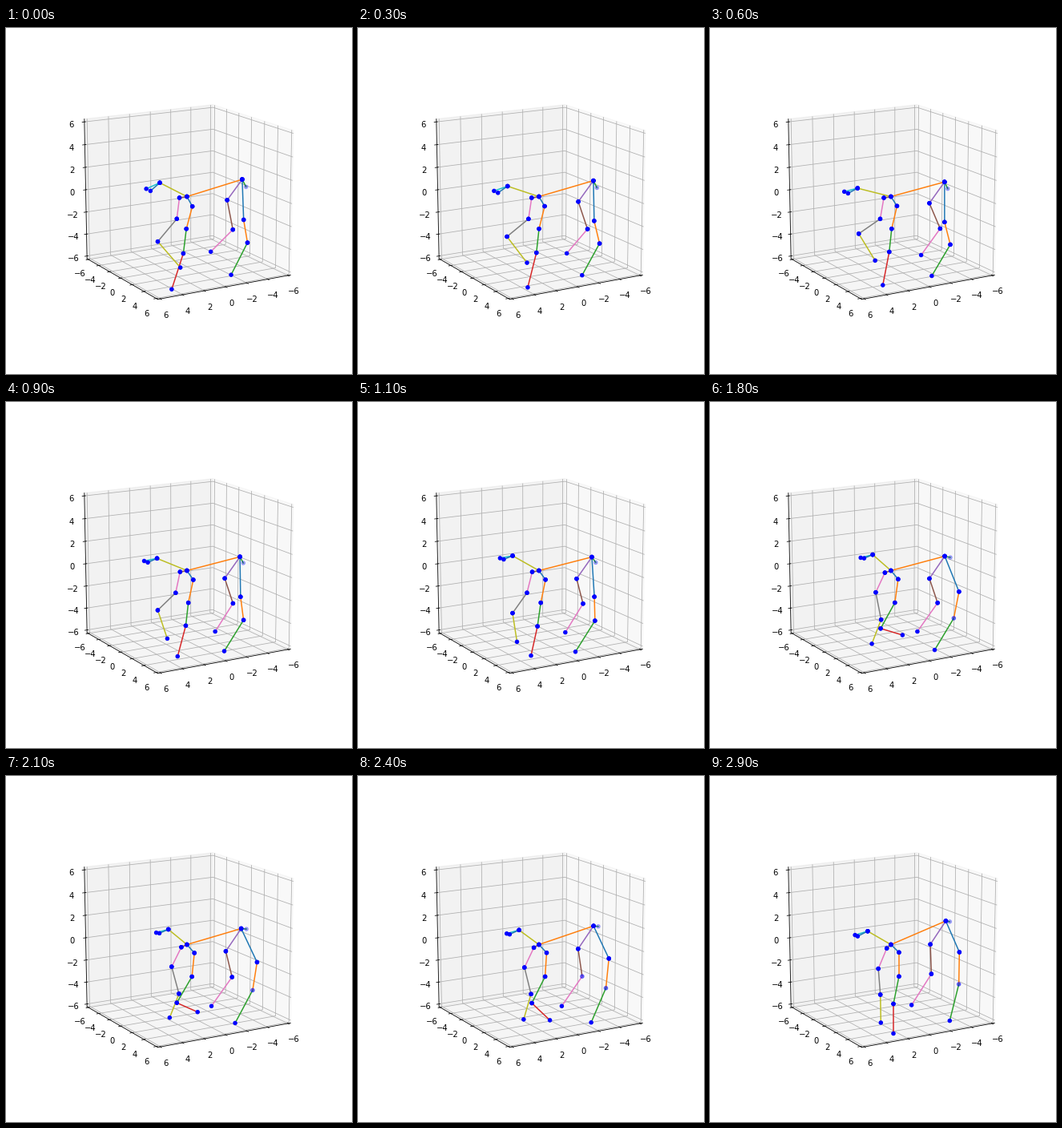
A matplotlib script that plays this animation: 432 px wide and 432 px high, repeating every 3000 ms.

```python
import numpy as np
import matplotlib.pyplot as plt
from matplotlib.animation import FuncAnimation

SIZE, DPI = 432, 72
FRAMES, INTERVAL = 30, 100
CHEST = (225.9, 210.5)


def smooth(values, u):
    """Cubic curve through evenly spaced values, u from 0 to 1."""
    slopes = np.gradient(values)
    k = min(int(u * (len(values) - 1)), len(values) - 2)
    s = u * (len(values) - 1) - k
    ease = s * s * (3 - 2 * s)
    return ((1 - ease) * values[k] + ease * values[k + 1]
            + s * (1 - s) * ((1 - s) * slopes[k] - s * slopes[k + 1]))


# Each bone: joint, parent, cycle colour, then the course of its length (px)
# and of its angle (degrees from straight down, positive to the right).
bones = [
    # nearer front leg
    ("shoulder_a", "chest", 0, (14, 14), (29, 38, 46)),
    ("elbow_a", "shoulder_a", 1, (29, 30), (-15, -10, 0)),
    ("wrist_a", "elbow_a", 2, (31, 29, 37.5, 35), (-7, -6, -9, -28, -28, -11.5)),
    ("paw_a", "wrist_a", 3, (47, 39, 28, 37), (-18, -11, -9, 71, 52, 0)),
    # other front leg
    ("shoulder_b", "chest", 5, (9.5, 7), (-81, -76, -48)),
    ("elbow_b", "shoulder_b", 6, (26.5, 27.5), (-7, -12.5, -26, -22.5)),
    ("wrist_b", "elbow_b", 7, (37, 31, 35, 32.5), (-40, -55.5, -32, 9, 14.5, 4.5)),
    ("paw_b", "wrist_b", 8, (43, 37, 32, 35), (41, 32, 6, -20, -18, 1)),
    # spine and hind legs
    ("hip", "chest", 1, (72.3, 68.3, 70, 74.6), (107.3, 104.5, 105.5, 113.3)),
    ("knee_c", "hip", 0, (50.5, 49, 42.5), (2, 1.5, 24, 23.5)),
    ("hock_c", "knee_c", 1, (29, 29.5, 34.5, 40), (9.5, 14.5, 0, -11, -6.5, -1)),
    ("paw_c", "hock_c", 2, (45, 47), (-27, -32, -30, -14)),
    ("knee_d", "hip", 4, (32, 35), (-36, -33.5)),
    ("hock_d", "knee_d", 5, (37.5, 31.5, 37), (11, 23, 14, 19, 9.5, 2)),
    ("paw_d", "hock_d", 6, (39, 43, 46), (-45, -32, -35.5, -32.5)),
    # head and tail
    ("neck", "chest", 8, (38, 43, 37, 30.5, 30.5, 33.5), (-117, -104, -121, -131, -127, -120)),
    ("nose", "neck", 9, (18.5, 15.5, 16.5), (-66, -79, -75, -73)),
    ("jaw", "neck", 0, (15.5, 11.5, 14), (-49, -67, -67, -63)),
    ("tail", "hip", 2, (10.5, 5), (27, 30, 82, 80)),
]

# Joints lying behind their neighbours, and the frames in which they do
behind = {"tail": range(FRAMES), "hock_c": range(18, FRAMES), "hock_d": range(22, 27)}


def pose_at(frame):
    """Hang every bone on its parent joint."""
    u = frame / (FRAMES - 1)
    joints = {"chest": np.array(CHEST)}
    for joint, parent, _, lengths, angles in bones:
        a = np.radians(smooth(angles, u))
        joints[joint] = joints[parent] + smooth(lengths, u) * np.array([np.sin(a), np.cos(a)])
    return joints


fig = plt.figure(figsize=(SIZE / DPI, SIZE / DPI), dpi=DPI, facecolor="white")

# Cube with a slightly non-square viewport
box = fig.add_axes([0.125, 0.125, 0.775, 0.755], projection="3d")
box.apply_aspect = lambda *args, **kwargs: None
box.set_box_aspect((1, 1, 1), zoom=np.sqrt(3) / 1.8294640721620434)
box.view_init(elev=15, azim=60)
ticks = np.arange(-6, 7, 2)
box.set(xlim=(-6.25, 6.25), ylim=(-6.25, 6.25), zlim=(-6.25, 6.25),
        xticks=ticks, yticks=ticks, zticks=ticks)

# Skeleton layer in pixel coordinates; every bone marks both of its ends
stage = fig.add_axes([0, 0, 1, 1], zorder=5)
stage.set(xlim=(0, SIZE), ylim=(SIZE, 0))
stage.axis("off")
lines = [stage.plot([], [], color=f"C{bone[2]}", lw=1.5)[0] for bone in bones]
ends = [name for joint, parent, *_ in bones for name in (parent, joint)]
dots = stage.scatter([0] * len(ends), [0] * len(ends), s=20, color="b", zorder=3)


def update(frame):
    joints = pose_at(frame)
    for line, (joint, parent, *_) in zip(lines, bones):
        line.set_data(*np.transpose([joints[parent], joints[joint]]))
    dots.set_offsets([joints[name] for name in ends])
    dots.set_color([(0, 0, 1, 0.3 if frame in behind.get(name, ()) else 1) for name in ends])
    return [*lines, dots]


anim = FuncAnimation(fig, update, frames=FRAMES, interval=INTERVAL, repeat=True)
plt.show()
```
